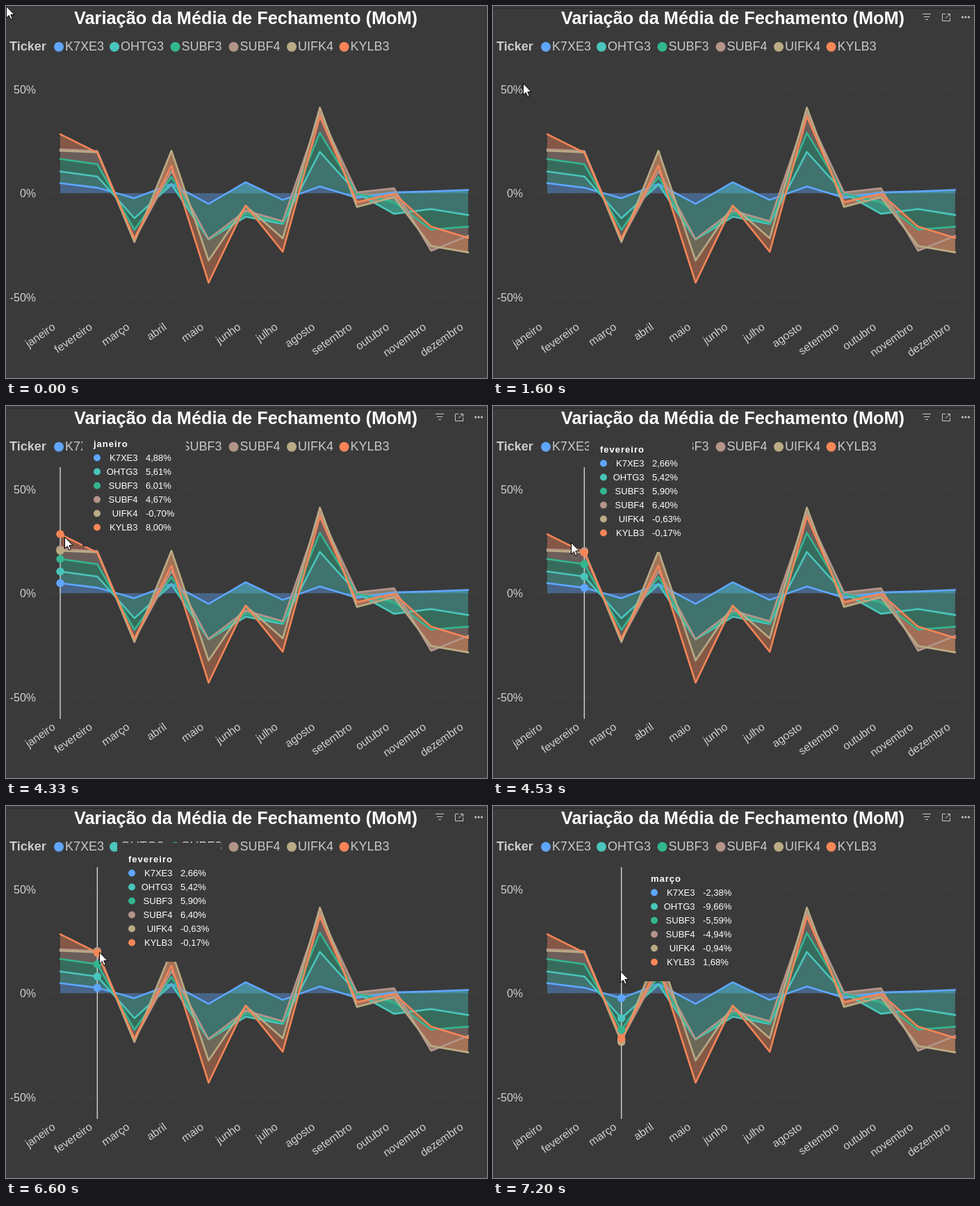
An HTML page with a canvas for the animation above (8 s loop, 692 px wide and 535 px high).

```html
<!DOCTYPE html>
<html lang="pt">
<head>
<meta charset="utf-8">
<style>
html, body { margin: 0; width: 100%; height: 100%; overflow: hidden; background: #3a3a3a; }
canvas { display: block; }
</style>
</head>
<body>
<canvas id="stage" width="692" height="535"></canvas>
<script>
const ctx = document.getElementById('stage').getContext('2d');
const BG = '#3a3a3a', FONT = '"Liberation Sans", Arial, sans-serif';
const LOOP = 8000, FPS = 15;

// name, colour, x of the legend dot
const series = [
  ['K7XE3', '#5ea6fe', 76], ['OHTG3', '#4ac5bb', 156], ['SUBF3', '#33b690', 243.5],
  ['SUBF4', '#b5948a', 327.5], ['UIFK4', '#b9ab85', 411], ['KYLB3', '#f68657', 486.5]
];
// monthly change of each series, in percent
const months = [
  ['janeiro', 4.88, 5.61, 6.01, 4.67, -0.70, 8.00],
  ['fevereiro', 2.66, 5.42, 5.90, 6.40, -0.63, -0.17],
  ['março', -2.38, -9.66, -5.59, -4.94, -0.94, 1.68],
  ['abril', 4.5, -.3, 3.7, 2.9, 9.7, -7.3],
  ['maio', -5.1, -17.2, 0, .2, -10.3, -10.7],
  ['junho', 5.3, -16.6, 1.7, 1.2, 2.3, .2],
  ['julho', -3.2, -11.6, .5, .8, -8.2, -6.5],
  ['agosto', 3.3, 16.6, 9.2, 9.5, 2.7, -4.3],
  ['setembro', -2.2, 2.3, -.3, .6, -7, 2.3],
  ['outubro', .4, -10.3, 5.6, 6.7, -4.3, 1.7],
  ['novembro', .9, -8.5, -9.9, -10.2, 2.3, 9.3],
  ['dezembro', 1.6, -12.1, -5.6, -4.4, -8, 7]
];

// cursor moves: first step, last step, target x and y, ease-out power for x and y
const moves = [
  [13, 36, 72, 186, 1.4, 1.4],
  [64, 72, 125, 206, 2, 1.1],
  [98, 108, 183, 238, 1.6, 1.5]
];
const HEADER_AT = 14, HOVER_AT = 28, TIP_AT = 41;

const xAt = m => 78 + m * 53.36;
const yAt = v => 269.3 - v * 2.985;

// stacks[0] is the zero line, stacks[i + 1] the top edge of series i
const stacks = [months.map(() => 0)];
series.forEach((_, i) => stacks.push(months.map((m, j) => stacks[i][j] + m[i + 1])));

function text(str, x, y, size, color, align = 'left', weight = '') {
  ctx.font = `${weight} ${size}px ${FONT}`;
  ctx.fillStyle = color;
  ctx.textAlign = align;
  ctx.fillText(str, x, y);
}

function dot(x, y, r, color) {
  ctx.fillStyle = color;
  ctx.beginPath();
  ctx.arc(x, y, r, 0, 7);
  ctx.fill();
}

function stroke(points, color, width, dash = []) {
  ctx.beginPath();
  points.forEach(p => ctx.lineTo(...p));
  ctx.strokeStyle = color;
  ctx.lineWidth = width;
  ctx.setLineDash(dash);
  ctx.stroke();
  ctx.setLineDash([]);
}

const edge = i => stacks[i].map((v, m) => [xAt(m), yAt(v)]);

function drawChart() {
  ctx.fillStyle = BG;
  ctx.fillRect(0, 0, 692, 535);
  stroke([[690.5, 0], [690.5, 535]], '#303030', 1, [2, 4]);
  text('Variação da Média de Fechamento (MoM)', 345, 26, 25.33, '#fff', 'center', 'bold');
  text('Ticker', 5, 64, 18, '#cdcdcd', 'left', 'bold');
  for (const [name, color, x] of series) {
    dot(x, 58.7, 7, color);
    text(name, x + 9, 64, 18, '#c8c8c8');
  }
  for (const v of [50, 0, -50]) {
    const y = Math.round(yAt(v)) + .5;
    stroke([[56, y], [683, y]], '#636363', 1, [1, 5]);
    text(v + '%', 43, y + 5.5, 16, '#d0d0d0', 'right');
  }
  months.forEach(([name], m) => {
    ctx.save();
    ctx.translate(xAt(m) - 6, 464);
    ctx.rotate(-35 * Math.PI / 180);
    text(name, 0, 0, 16, '#d0d0d0', 'right');
    ctx.restore();
  });
  ctx.lineJoin = ctx.lineCap = 'round';
  ctx.globalAlpha = .4;
  series.forEach(([, color], i) => {
    ctx.beginPath();
    [...edge(i + 1), ...edge(i).reverse()].forEach(p => ctx.lineTo(...p));
    ctx.fillStyle = color;
    ctx.fill();
  });
  ctx.globalAlpha = 1;
  series.forEach(([, color], i) => stroke(edge(i + 1), color, 2.6));
  ctx.lineCap = 'butt';
  ctx.lineJoin = 'miter';
}

function drawHeader() {
  const c = '#c8c8c8';
  stroke([[0, 3.5], [692, 3.5]], '#282828', 1);
  [6, 4, 2].forEach((w, i) => stroke([[624 - w, 11.5 + i * 4], [624 + w, 11.5 + i * 4]], c, 1));
  stroke([[651, 11.5], [646.5, 11.5], [646.5, 21.5], [657.5, 21.5], [657.5, 17]], c, 1);
  stroke([[653.5, 11.5], [657.5, 11.5], [657.5, 15.5]], c, 1);
  stroke([[657.5, 11.5], [651, 17.5]], c, 1);
  [675.5, 680, 684.5].forEach(x => dot(x, 16, 1.6, c));
}

function drawHover(m) {
  stroke([[xAt(m), 88], [xAt(m), 450]], '#d4d4d4', 1.4);
  series.forEach(([, color], i) => dot(xAt(m), yAt(stacks[i + 1][m]), 5.7, color));
}

function drawTip(m, [cx, cy]) {
  const x = Math.round(cx) + 44, y = Math.round(cy) - 134;
  ctx.fillStyle = BG;
  ctx.fillRect(x - 16, y - 23, 149, 171);
  ctx.letterSpacing = '1px';
  text(months[m][0], x, y + 5, 13, '#fff', 'left', 'bold');
  ctx.letterSpacing = '0px';
  series.forEach(([name, color], i) => {
    const row = y + 20.5 + i * 20;
    dot(x + 5, row, 5, color);
    text(name, x + 63.5, row + 4.5, 13, '#fff', 'right');
    text(months[m][i + 1].toFixed(2).replace('.', ',') + '%', x + 75, row + 4.5, 13, '#fff');
  });
}

function cursorAt(step) {
  let x = 0, y = 1;
  for (const [from, to, tx, ty, px, py] of moves) {
    const left = 1 - Math.min(1, Math.max(0, (step - from) / (to - from)));
    x = tx + (x - tx) * left ** px;
    y = ty + (y - ty) * left ** py;
  }
  return [x, y];
}

function drawCursor([x, y]) {
  ctx.save();
  ctx.translate(Math.round(x) + .5, Math.round(y) - .5);
  ctx.beginPath();
  [[0, 0], [0, 16.5], [3.8, 13], [6.3, 18.8], [8.8, 17.8], [6.3, 12], [11.5, 12]]
    .forEach(p => ctx.lineTo(...p));
  ctx.closePath();
  ctx.fillStyle = '#fff';
  ctx.fill();
  ctx.strokeStyle = '#000';
  ctx.lineWidth = 1;
  ctx.stroke();
  ctx.restore();
}

function frame() {
  const step = Math.floor((performance.now() % LOOP) * FPS / 1000 + .06);
  const cursor = cursorAt(step);
  const month = Math.max(0, Math.round((cursor[0] - xAt(0)) / 53.36));
  drawChart();
  if (step >= HEADER_AT) drawHeader();
  if (step >= HOVER_AT) drawHover(month);
  if (step >= TIP_AT) drawTip(month, cursorAt(step - .2)); // the box trails the pointer
  drawCursor(cursor);
  requestAnimationFrame(frame);
}
frame();
</script>
</body>
</html>
```
